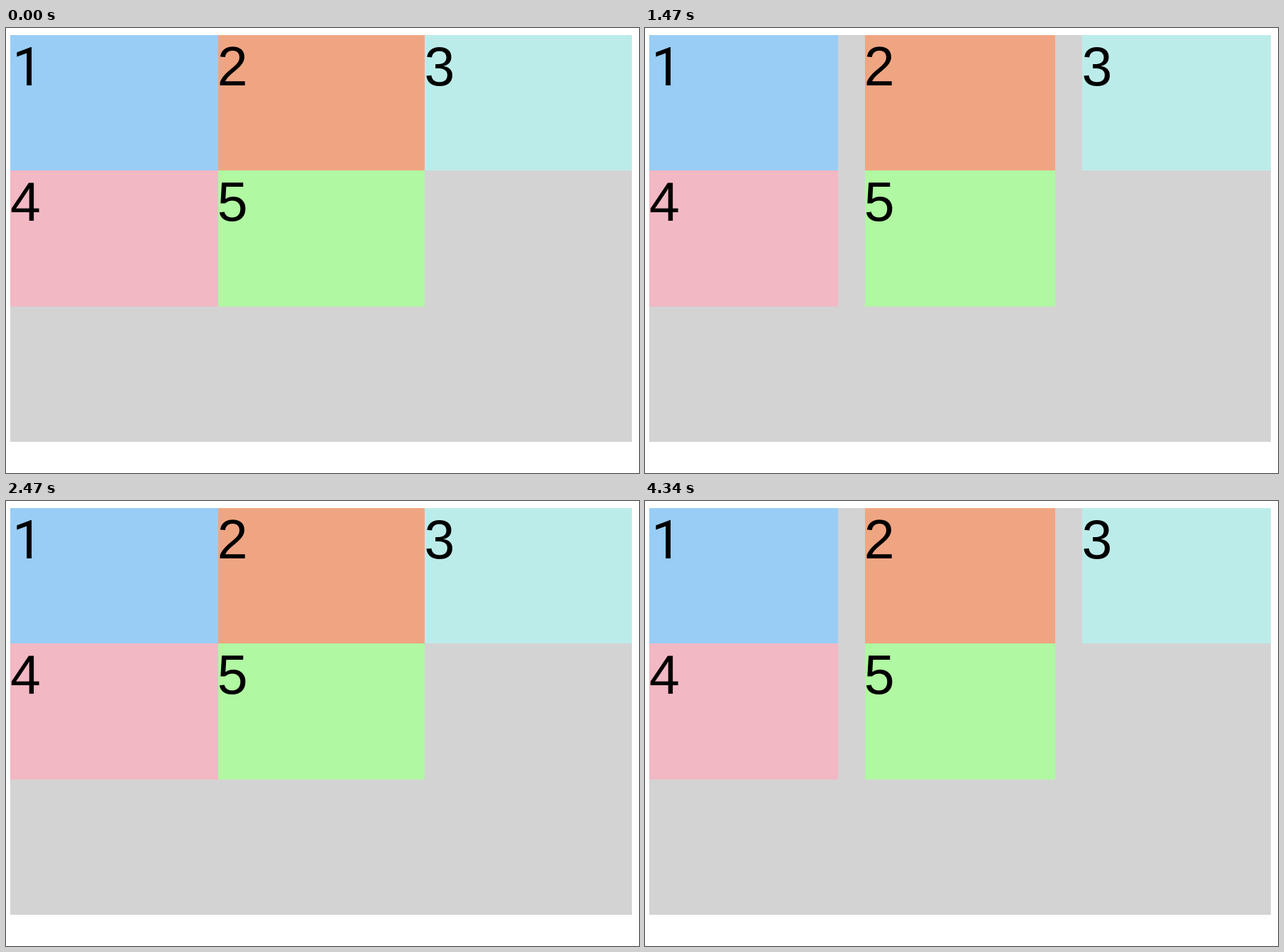
Write an HTML page with a canvas that moves like this. It is 892 by 628 pixels and loops after 5 s.

```html
<!DOCTYPE html>
<html lang="en">
<head>
<meta charset="utf-8">
<title>Grid column gap</title>
<style>
  html, body { margin: 0; width: 100%; height: 100%; overflow: hidden; background: #fff; }
  canvas { display: block; }
</style>
</head>
<body>
<canvas id="stage" width="892" height="628"></canvas>
<script>
const ctx = document.getElementById("stage").getContext("2d");
const LOOP = 5000;
const SWITCHES = [1470, 2470, 3350];
const ROWS = [10, 201, 393];

// Left and right edge of each column, without and with the gap.
const CLOSED = [[6, 299], [299, 590], [590, 882]];
const OPEN = [[6, 272], [310, 578], [616, 882]];

const SANS = '77px "Liberation Sans", Arial, sans-serif';
const FOOTLESS = '76px Roboto, sans-serif';

const CELLS = [
  { label: "1", color: "#99cdf5", font: FOOTLESS, dx: 3 },
  { label: "2", color: "#f0a582", font: SANS, dx: -1.2 },
  { label: "3", color: "#bcecea", font: SANS, dx: -0.5 },
  { label: "4", color: "#f2b8c3", font: SANS, dx: 0 },
  { label: "5", color: "#b0f8a1", font: SANS, dx: -1.2 }
];

function draw(open) {
  ctx.fillStyle = "#fff";
  ctx.fillRect(0, 0, 892, 628);
  ctx.fillStyle = "#d3d3d3";
  ctx.fillRect(6, 10, 876, 574);

  CELLS.forEach((cell, i) => {
    const [left, right] = (open ? OPEN : CLOSED)[i % 3];
    const row = Math.floor(i / 3);
    ctx.fillStyle = cell.color;
    ctx.fillRect(left, ROWS[row], right - left, ROWS[row + 1] - ROWS[row]);
    ctx.fillStyle = "#000";
    ctx.font = cell.font;
    ctx.fillText(cell.label, left + cell.dx, ROWS[row] + 70.7);
  });
}

function tick() {
  const time = performance.now() % LOOP;
  const passed = SWITCHES.filter(t => time >= t).length;
  draw(passed % 2 === 1);
  requestAnimationFrame(tick);
}
tick();
</script>
</body>
</html>
```
